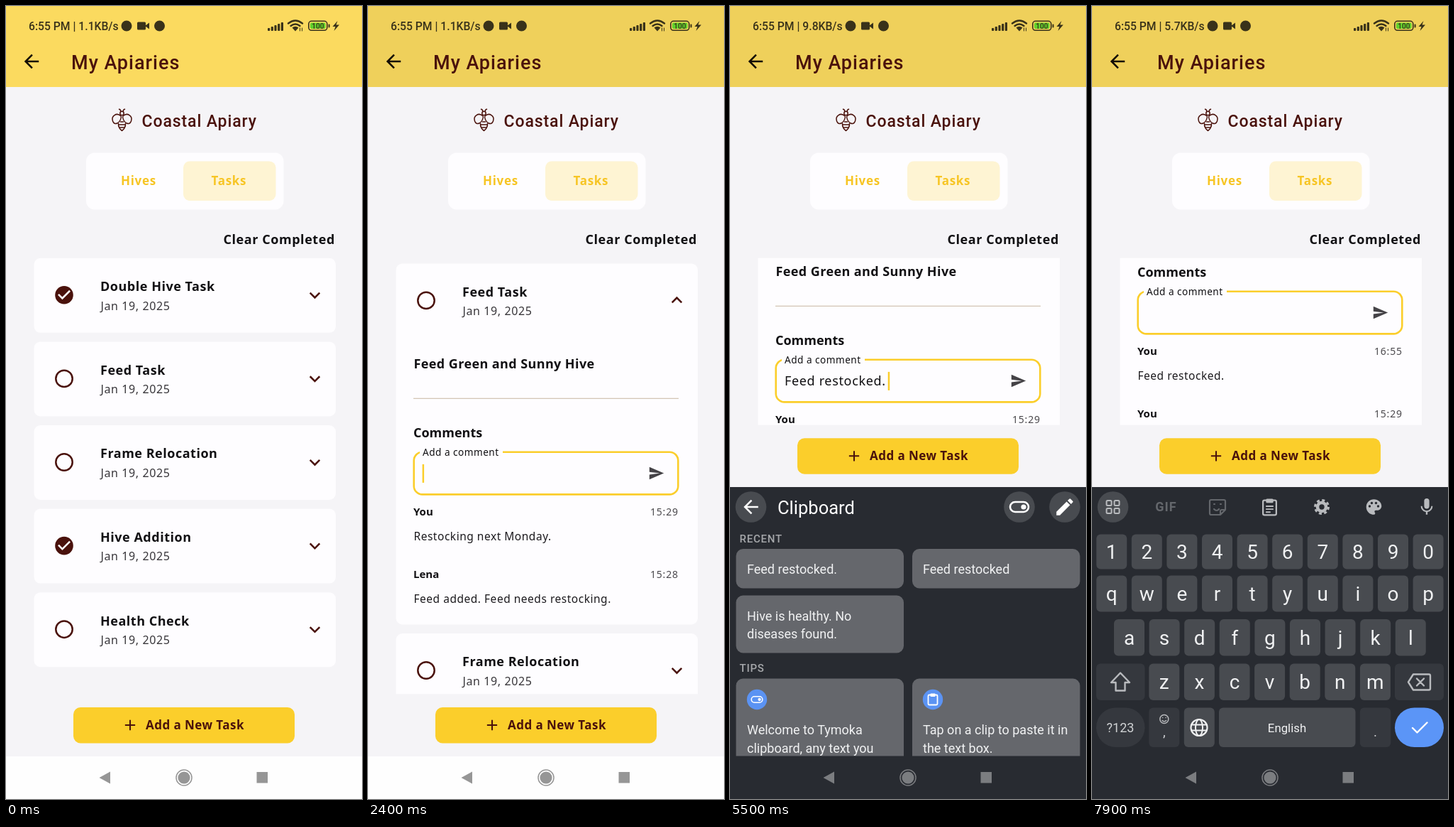
Recreate the animation shown at these times as an HTML page. Size 502x1116 px, loop 8 s.

```html
<!DOCTYPE html>
<html lang="en">
<head>
<meta charset="utf-8">
<title>My Apiaries</title>
<style>
html, body { margin: 0; width: 100%; height: 100%; overflow: hidden; background: #f5f4f7; }
svg { display: block; width: 100vw; height: 100vh; }
text { font-family: "Noto Sans", "Open Sans", sans-serif; white-space: pre; }
.r { font-family: Roboto, sans-serif; }
.ln { fill: none; stroke-linecap: round; stroke-linejoin: round; }
</style>
</head>
<body>
<script>
const LOOP = 8000, BROWN = '#4a120c', YELLOW = '#fbce2b', CARD = '#fefdff', INK = '#111013';
const TOP = 354.8, PITCH = 117.6, CARD_H = 105;

const text = (x, y, s, size, o = {}) =>
  `<text x="${x}" y="${y}" font-size="${size}" font-weight="${o.w || 400}" fill="${o.c || INK}"` +
  ` letter-spacing="${o.ls || 0}" text-anchor="${o.a || 'start'}" class="${o.r ? 'r' : ''}"` +
  `${o.id ? ` id="${o.id}"` : ''}>${s}</text>`;
const box = (x, y, w, h, rx, fill, more = '') =>
  `<rect x="${x}" y="${y}" width="${w}" height="${h}" rx="${rx}" fill="${fill}" ${more}/>`;
const dot = (x, y, r, fill, more = '') => `<circle cx="${x}" cy="${y}" r="${r}" fill="${fill}" ${more}/>`;
const ring = (x, y, r, c, w, more = '') => dot(x, y, r, 'none', `stroke="${c}" stroke-width="${w}" ${more}`);
const line = (d, c, w) => `<path class="ln" d="${d}" stroke="${c}" stroke-width="${w}"/>`;
const fill = (d, c) => `<path d="${d}" fill="${c}"/>`;
const group = (id, s, more = '') => `<g id="${id}" ${more}>${s}</g>`;

// 24-unit glyphs, placed by their centre
const GLYPH = {
  back: 'M20 11H7.83l5.59-5.59L12 4l-8 8 8 8 1.41-1.41L7.83 13H20z',
  down: 'M16.59 8.59 12 13.17 7.41 8.59 6 10l6 6 6-6z',
  done: 'M12 2a10 10 0 1 0 0 20 10 10 0 0 0 0-20zm-2 15-5-5 1.41-1.41L10 14.17l7.59-7.59L19 8z',
  send: 'M2.01 21 23 12 2.01 3 2 10l15 2-15 2z',
  plus: 'M19 13h-6v6h-2v-6H5v-2h6V5h2v6h6z',
  edit: 'M3 17.25V21h3.75L17.81 9.94l-3.75-3.75zM20.71 7.04a1 1 0 0 0 0-1.41l-2.34-2.34a1 1 0 0 0-1.41 0l-1.83 1.83 3.75 3.75z',
  mic: 'M12 14a3 3 0 0 0 3-3V5a3 3 0 0 0-6 0v6a3 3 0 0 0 3 3zm5.3-3a5.3 5.3 0 0 1-10.6 0H5a7 7 0 0 0 6 6.92V21h2v-3.08A7 7 0 0 0 19 11z',
  palette: 'M12 3a9 9 0 0 0 0 18c.83 0 1.5-.67 1.5-1.5 0-.39-.15-.74-.39-1.01-.23-.26-.38-.61-.38-.99 0-.83.67-1.5 1.5-1.5H16c2.76 0 5-2.24 5-5 0-4.42-4.03-8-9-8z'
};
const glyph = (name, x, y, k, c, more = '') =>
  `<path d="${GLYPH[name]}" fill="${c}" transform="translate(${x} ${y}) scale(${k}) translate(-12 -12)" ${more}/>`;

function statusBar() {
  const c = '#39321a';
  let s = text(32, 33.5, '', 15.7, { r: 1, w: 500, c, id: 'clock' });
  s += dot(170, 28, 7.5, c) + dot(216.5, 28, 7.5, c);
  s += box(185, 22.5, 12, 11, 1.5, c) + fill('M196 28l6-4.5v9z', c);
  for (let i = 0; i < 5; i++) s += box(369 + i * 4.7, 31 - i * 2, 3.2, 4 + i * 2, 1, c);
  [[10, 24.5], [6.4, 28]].forEach(([w, y]) =>
    s += line(`M${408 - w} ${y}Q408 ${y - w * 0.8} ${408 + w} ${y}`, c, 2.5));
  s += fill('M403.5 30.5q4.5-3.5 9 0L408 35.5z', c) + line('M414.5 31v4M417.5 31v4', c, 1);
  s += box(426.8, 21.3, 26, 13, 4, 'none', `stroke="${c}" stroke-width="1.6"`);
  s += box(429, 23.5, 21.6, 8.6, 2, '#62d12c') + box(454.6, 25.5, 2, 5, 1, c);
  s += text(439.8, 31.6, '100', 10, { r: 1, w: 500, c, a: 'middle' });
  return s + fill('M467.5 21l-7 8h4l-2 6 7.5-8.500h-4.500z', c);
}

function bee() {
  const wing = 'M162 155C156 149 148 155 150.500 162C153 169 161 165 162.500 156';
  const w = line(wing, BROWN, 1.5);
  return w + `<g transform="matrix(-1 0 0 1 327 0)">${w}</g>` +
    ring(163.5, 151, 2.7, BROWN, 1.5) +
    line('M162 148.500q-.5-3-2.500-3.200M165 148.500q.5-3 2.500-3.200', BROWN, 1.5) +
    line('M158.500 165.500C158 170 161 174 163.500 175.500C166 174 169 170 168.500 165.500', BROWN, 1.5) +
    line('M161.500 163h4M159 167h9M160.500 171h6', BROWN, 1.5);
}

function header() {
  return box(0, 0, 502, 114, 0, '#fbda5f', 'id="bar"') + statusBar() +
    glyph('back', 36, 78, 1.28, '#140d05') +
    text(92, 89, 'My Apiaries', 27, { r: 1, w: 500, c: BROWN, ls: 1 }) +
    bee() + text(191.5, 170, 'Coastal Apiary', 23, { r: 1, w: 500, c: BROWN, ls: .9 }) +
    box(113, 206.5, 278.5, 80, 12, CARD) + box(250, 218.5, 130.5, 55.5, 9, '#fef4d3') +
    text(162, 251.8, 'Hives', 17, { w: 700, c: '#f7c524', ls: .7 }) +
    text(289.5, 251.8, 'Tasks', 17, { w: 700, c: '#f7c524', ls: .7 }) +
    text(306.5, 335, 'Clear Completed', 18, { w: 600, ls: .56 });
}

const cardHead = (title, done, chevron = '') =>
  (done ? glyph('done', 82, 52, 1.28, BROWN) : ring(82, 52, 11.7, BROWN, 2.5)) +
  text(133, 46.4, title, 18, { w: 600, ls: .52 }) +
  text(133.5, 72.8, 'Jan 19, 2025', 16, { c: '#38363a', ls: .6 }) +
  glyph('down', 435.5, 52.3, 1.28, BROWN, chevron);
const card = (i, title, done) =>
  `<g transform="translate(0 ${TOP + PITCH * i})">${box(39.5, 0, 425.5, CARD_H, 9, CARD)}${cardHead(title, done)}</g>`;
const comment = (y, who, time, msg) =>
  text(64, y, who, 15, { w: 700 }) + text(398, y - .5, time, 14, { c: '#4b494d', ls: .8 }) +
  text(64.5, y + 35, msg, 15.5, { c: '#1d1b1f', ls: .52 });

function feedCard() {
  const field = box(64.7, 265.3, 372.6, 59.7, 12, 'none', 'id="field"') +
    box(73, 262, 117, 7, 0, CARD, 'id="notch"') +
    group('label', text(0, 0, 'Add a comment', 18, { ls: .65 })) +
    text(77, 301.5, 'Feed restocked.', 18, { ls: .65, id: 'typed' }) +
    box(76.6, 282.5, 2.5, 26, 0, YELLOW, 'id="caret"') +
    glyph('send', 406.5, 295.2, .97, '#454347');
  const body = cardHead('Feed Task', false, 'id="chevron"') +
    text(64.5, 147.5, 'Feed Green and Sunny Hive', 18, { w: 600, ls: .4 }) +
    box(64, 189.3, 374, 1.3, 0, '#d3c6b6') +
    text(64, 244.6, 'Comments', 18, { w: 700 }) + field +
    group('fresh', comment(355, 'You', '16:55', 'Feed restocked.')) +
    group('older', comment(355, 'You', '15:29', 'Restocking next Monday.') +
      comment(443, 'Lena', '15:28', 'Feed added. Feed needs restocking.'));
  return `<g transform="translate(0 ${TOP + PITCH})">${box(39.5, 0, 425.5, CARD_H, 9, CARD, 'id="feed"')}` +
    `<g clip-path="url(#feedClip)">${body}</g></g>`;
}

function clipIcon(x, y, k, c) {
  return `<g transform="translate(${x} ${y}) scale(${k})">` +
    box(-9, -9, 18, 20, 2, 'none', `stroke="${c}" stroke-width="2.2"`) +
    box(-5, -11, 10, 5.5, 1.5, c) + line('M-4.500 -1h9M-4.500 3h9M-4.500 7h5', c, 1.8) + '</g>';
}

function keyboard() {
  const KEY = '#484b50', DIM = '#35383e', PALE = '#b9bbbe', WHITE = '#f0f1f2', MUTED = '#64676c', BG = '#282b31';
  let s = dot(29.5, 705, 21.8, '#484b50');
  for (const dx of [-5.5, 5.5]) for (const dy of [-5.5, 5.5])
    s += box(26 + dx, 701.500 + dy, 7, 7, 1.5, 'none', `stroke="${PALE}" stroke-width="2"`);
  s += text(104.5, 711, 'GIF', 18, { r: 1, w: 700, c: MUTED, ls: 1, a: 'middle' });
  s += line('M168 695h18q2 0 2 2v12l-7 7h-13q-2 0-2-2v-17q0-2 2-2M188 709h-5q-2 0-2 2v5M172 708q4 4 7 0M172 701h1M181 701h1', MUTED, 2.2);
  s += box(218, 684.5, 66, 41, 11, '#66696e', 'id="press"') + clipIcon(250.5, 705, 1.04, PALE);
  s += ring(324, 705, 6, PALE, 4.6) + ring(324, 705, 9.5, PALE, 3, 'stroke-dasharray="4 3.46"');
  s += glyph('palette', 397.5, 705, 1.2, PALE);
  [[-6, -1], [-3, -5.5], [3, -5.5], [6, -1]].forEach(([x, y]) => s += dot(397.5 + x, 705 + y, 1.7, BG));
  s += glyph('mic', 472, 705, 1.2, PALE);
  const row = (keys, x, y, h) => [...keys].forEach((k, i) => {
    const kx = x + i * 49.6;
    s += box(kx - 21.5, y, 43, h, 6, KEY) + text(kx, y + h / 2 + 10, k, 28, { r: 1, c: WHITE, a: 'middle' });
  });
  row('1234567890', 27.7, 743.5, 49);
  row('qwertyuiop', 27.7, 801.500, 51);
  row('asdfghjkl', 52.5, 863, 51.5);
  row('zxcvbnm', 101.800, 925.5, 51.5);
  s += box(6, 925.5, 68.5, 51.5, 6, DIM) + box(427, 925.5, 69, 51.5, 6, DIM);
  s += line('M40 938.500l13 13.500h-6.500v11.500h-13v-11.500h-6.500z', PALE, 2.4);
  s += line('M453 940.500h22q2 0 2 2v18q0 2-2 2h-22l-7-11zM458 946.500l10 10M468 946.500l-10 10', PALE, 2.4);
  s += box(6, 987.5, 68.5, 55.5, 27.7, DIM) + text(40, 1022, '?123', 18, { r: 1, c: '#cfd1d3', a: 'middle' });
  s += box(80.300, 987.5, 43, 55.5, 6, DIM) + ring(101.800, 1003.500, 6, PALE, 1.5) +
    line('M99 1005.500q2.800 2.800 5.600 0M99.500 1001.500h.2M104 1001.500h.2', PALE, 1.4) +
    text(101.800, 1028, ',', 19, { r: 1, c: '#cfd1d3', a: 'middle' });
  s += box(129.800, 987.5, 43, 55.5, 6, KEY) + ring(151, 1015.5, 11.5, WHITE, 2.2) +
    `<ellipse cx="151" cy="1015.5" rx="5" ry="11.5" fill="none" stroke="${WHITE}" stroke-width="2"/>` +
    line('M140.500 1011.500h21M140.500 1019.500h21', WHITE, 2);
  s += box(179, 987.5, 192.5, 55.5, 6, KEY) + text(275, 1021.5, 'English', 16.8, { r: 1, c: WHITE, a: 'middle' });
  s += box(377.800, 987.5, 43.5, 55.5, 6, DIM) + text(399.5, 1028, '.', 19, { r: 1, c: '#cfd1d3', a: 'middle' });
  s += box(427, 987.5, 69, 55.5, 27.7, '#5b95f7') + line('M452 1016l6.500 6.500l14-14', '#fff', 2.4);
  return s;
}

function clipboard() {
  const ROUND = '#484b50', CLIP = '#65676c', WHITE = '#f1f2f3', BLUE = '#5b93f3';
  const pill = (x, y, k) => `<g transform="translate(${x} ${y}) scale(${k})">` +
    box(-13, -7, 26, 14, 7, 'none', 'stroke="#fff" stroke-width="2.6"') + dot(6, 0, 3.6, '#fff') + '</g>';
  const words = (x, y, rows) => rows.map((s, i) => text(x, y + i * 25.500, s, 18, { r: 1, c: WHITE })).join('');
  let s = dot(29.5, 705, 21.8, ROUND) + glyph('back', 29.5, 705, 1.28, '#fff') +
    text(67, 715, 'Clipboard', 25.5, { r: 1, c: '#fff' }) +
    dot(408, 705, 21.8, ROUND) + pill(408, 705, 1) +
    dot(472, 705, 21.8, ROUND) + glyph('edit', 472, 705, 1.3, '#fff');
  const head = { r: 1, w: 500, c: '#a6a8ab', ls: .8 };
  s += text(13.5, 754.5, 'RECENT', 15, head) + text(13.5, 937, 'TIPS', 15, head);
  s += box(8.5, 764, 236.5, 55.5, 10, CLIP) + box(8.5, 764, 236.5, 55.5, 10, '#b5b6b9', 'id="hot"') +
    words(24, 799, ['Feed restocked.']);
  s += box(257, 764, 236.5, 55.5, 10, CLIP) + words(272, 799, ['Feed restocked']);
  s += box(8.5, 829.5, 236.5, 81, 10, CLIP) + words(24, 864.5, ['Hive is healthy. No', 'diseases found.']);
  s += '<g clip-path="url(#tips)">' + box(8.5, 946.5, 236.5, 140, 10, CLIP) + box(257, 946.5, 236.5, 140, 10, CLIP) +
    dot(38, 976, 14.2, BLUE) + pill(38, 976, .6) + dot(286, 976, 14.2, BLUE) +
    box(279.5, 969.5, 13, 14, 1.5, 'none', 'stroke="#fff" stroke-width="1.8"') + box(282.5, 967.5, 7, 4.5, 1, '#fff') +
    words(24, 1025, ['Welcome to Tymoka', 'clipboard, any text you']) +
    words(272, 1025, ['Tap on a clip to paste it in', 'the text box.']) + '</g>';
  return s;
}

const clip = (id, x, y, w, h, rx, rid) =>
  `<clipPath id="${id}">${box(x, y, w, h, rx, '#000', rid ? `id="${rid}"` : '')}</clipPath>`;

document.body.innerHTML = `<svg viewBox="0 0 502 1116" preserveAspectRatio="none">
<defs>${clip('listClip', 0, TOP, 502, 613.5, 0, 'listBox')}${clip('feedClip', 39.5, 0, 425.5, CARD_H, 9, 'feedBox')}${clip('tips', 0, 940, 502, 115.5, 0)}</defs>
${box(0, 0, 502, 1116, 0, '#f5f4f7')}${box(0, 1056, 502, 60, 0, '#fefefe')}${header()}
<g clip-path="url(#listClip)">${group('scroll',
  card(0, 'Double Hive Task', true) + feedCard() +
  group('rest', card(2, 'Frame Relocation') + card(3, 'Hive Addition', true) + card(4, 'Health Check')))}</g>
${group('add', box(95, 987, 312, 50.5, 10, YELLOW) + glyph('plus', 175, 1012, 1.02, BROWN) +
  text(197, 1018, 'Add a New Task', 17, { w: 700, c: BROWN, ls: .45 }))}
${group('board', box(0, 677, 502, 441, 0, '#282b31') + group('keys', keyboard()) + group('clips', clipboard()))}
${group('nav', '<path d="M131.500 1086l15.500-8.500v17z"/><rect x="353.5" y="1078" width="15.500" height="15.500"/>' +
  dot(251, 1086, 8.6, 'inherit', 'style="fill:inherit"') +
  '<circle cx="251" cy="1086" r="11" style="fill:none;stroke:currentColor" stroke-width="1.5"/>')}
</svg>`;

const el = {};
document.querySelectorAll('[id]').forEach(n => el[n.id] = n);
const set = (id, o) => { for (const k in o) el[id].setAttribute(k, o[k]); };
const show = (id, on) => set(id, { opacity: +on });
const moveY = (id, y) => set(id, { transform: `translate(0 ${y.toFixed(2)})` });

const prog = (t, a, b) => Math.min(1, Math.max(0, (t - a) / (b - a)));
const out = (t, a, b) => 1 - (1 - prog(t, a, b)) ** 3;
const swing = (t, a, b) => (1 - Math.cos(Math.PI * prog(t, a, b))) / 2;
const mix = (a, b, k) => a + (b - a) * k;
const rgb = (a, b, k) => `rgb(${a.map((v, i) => Math.round(mix(v, b[i], k)))})`;

const FOCUS = 2250, PASTE = 4350, SENT = 6950, CLIPS_IN = 3550, CLIPS_OUT = 6300;

function draw(t) {
  const open = out(t, 300, 800), focus = out(t, FOCUS, 2400), kb = out(t, 2500, 2850);
  const sent = t >= SENT, typed = t >= PASTE && !sent, panel = t >= CLIPS_IN && t < CLIPS_OUT;
  const extra = open * 403 + (sent ? 88 : 0);

  el.clock.textContent = `6:55 PM | ${t < 3000 ? '1.1' : t < 7000 ? '9.8' : '5.7'}KB/s`;
  set('bar', { fill: rgb([251, 218, 95], [239, 208, 91], prog(t, 1450, 1750)) });

  moveY('scroll', -(110 * swing(t, 1400, 2200) + 130 * kb + 96 * swing(t, 7200, 7850)));
  moveY('rest', extra);
  set('feed', { height: CARD_H + extra });
  set('feedBox', { height: CARD_H + extra });
  set('listBox', { height: 613.5 - 378.5 * kb });
  set('chevron', { transform: `translate(435.5 ${mix(52.3, 51.5, open)}) rotate(${180 * open}) scale(1.28) translate(-12 -12)` });

  set('field', { stroke: rgb([112, 106, 104], [251, 206, 43], focus), 'stroke-width': mix(1.3, 2.6, focus) });
  show('notch', focus > .6);
  set('label', { transform: `translate(77 ${mix(301.5, 270.6, focus)}) scale(${mix(1, .756, focus)})` });
  show('typed', typed);
  show('fresh', sent);
  moveY('older', sent ? 88 : 0);

  // the caret blinks every half second, starting anew at each edit
  const since = sent ? t - SENT : typed ? t - 4300 : t - 2400;
  show('caret', t >= 2400 && since % 1000 < 500);
  set('caret', { x: typed ? 222.7 : 76.6 });

  moveY('add', -378.7 * kb);
  moveY('board', 440 * (1 - kb));
  set('keys', { display: panel ? 'none' : 'inline' });
  set('clips', { display: panel ? 'inline' : 'none' });
  show('press', t >= 3350 && t < CLIPS_IN);
  set('hot', { opacity: t < 4200 ? 0 : 1 - prog(t, 4350, 4600) });
  const tint = kb > .1 ? '#7b7d80' : '#969696';
  set('nav', { fill: tint, color: tint });
}

const frame = () => {
  draw(performance.now() % LOOP);
  requestAnimationFrame(frame);
};
frame();
</script>
</body>
</html>
```
